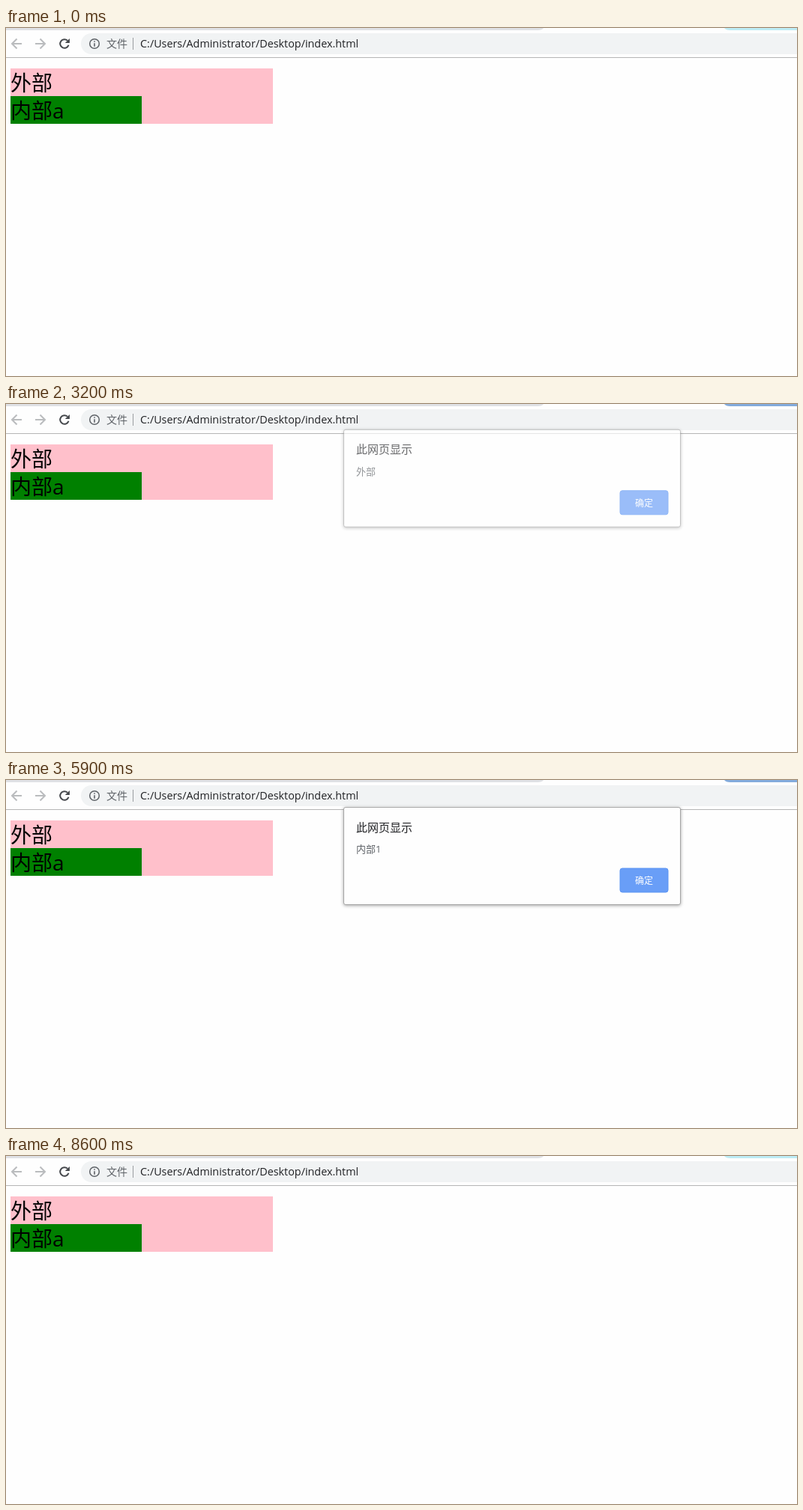
These frames come from a looping animation (1055x465 px, 8.7 s). An HTML page:

```html
<!DOCTYPE html>
<html lang="zh-CN">
<head>
<meta charset="utf-8">
<title>index</title>
<style>
  html, body { margin: 0; width: 100%; height: 100%; overflow: hidden; background: #fefefe; }
  svg { display: block; width: 100%; height: 100%; font-family: "Open Sans", "Noto Sans CJK SC", "Noto Sans CJK", sans-serif; }
  .line { fill: none; stroke-width: 2; }
  .page { font-size: 28px; fill: #000; }
  .frame { fill: #fefefe; stroke: #a6a6a6; filter: drop-shadow(0 1.5px 2px rgba(0, 0, 0, .35)); }
</style>
</head>
<body>
<svg viewBox="0 0 1055 465">
  <path d="M0 0H717Q715 3 709 3H0z" fill="#dfe1e5"/>
  <path id="tab" d="M958 0H1055V3H966Q960 3 958 0z"/>

  <path class="line" stroke="#babcbe" d="M21 21H8.5M14.5 14.5L8 21l6.5 6.5M39 21H51.5M45.5 14.5L52 21l-6.5 6.5"/>
  <path class="line" stroke="#45484c" d="M83.5 22.7A5.8 5.8 0 1 1 82.1 16.9"/>
  <path fill="#45484c" d="M84.9 14V20.1H78.8z"/>

  <path fill="#f1f3f4" d="M1055 7H114a14 14 0 0 0 0 28H1055z"/>
  <circle cx="118" cy="21" r="6.3" fill="none" stroke="#5f6368" stroke-width="1.5"/>
  <path fill="#5f6368" d="M117.2 17.2h1.6v1.6h-1.6zM117.2 20.2h1.6v4.6h-1.6z"/>
  <text x="134" y="26" font-size="14" fill="#5f6368">文件</text>
  <path fill="#9a9da1" d="M169 13h1v16h-1z"/>
  <text x="179" y="26" font-size="14.37" fill="#202124">C:/Users/Administrator/Desktop/index.html</text>
  <path fill="#b6b6b6" d="M0 39H1055v1H0z"/>

  <rect x="6" y="54" width="350" height="74" fill="pink"/>
  <rect x="6" y="91" width="175" height="37" fill="green"/>
  <text class="page" x="6" y="84">外部</text>
  <text class="page" x="6" y="121">内部a</text>

  <g id="dialog">
    <rect class="frame" x="450.5" y="36.5" width="449" height="130" rx="2.5"/>
    <text x="467" y="68.7" font-size="15" fill="#202124">此网页显示</text>
    <rect id="mark" y="82" height="20" fill="#1967d2"/>
    <text id="message" y="97" font-size="13"></text>
    <rect id="button" x="819" y="118" width="64" height="32" rx="3"/>
    <text x="839" y="139" font-size="12" font-weight="500" fill="#fff">确定</text>
  </g>
</svg>

<script>
const LOOP = 8700, TICK = 100;
const $ = id => document.getElementById(id);

// drags: the text cursor moves from one character edge to another
const dialogs = [
  { text: '内部2', open: 900, ready: 1200, blur: 1800, press: 2700, close: 2800,
    drags: [{ from: 3, to: 0, start: 1800, end: 2000 }] },
  { text: '外部', open: 3100, ready: 3300, blur: 4200, press: 5300, close: 5600,
    drags: [{ from: 1, to: 0, start: 4400, end: 4400 }, { from: 0, to: 2, start: 4700, end: 4800 }] },
  { text: '内部1', open: 5800, ready: 5900, blur: 6500, press: 7400, close: 7500,
    drags: [{ from: 3, to: 0, start: 6500, end: 6600 }] }
];

// Stepped progress: the first step shows at start, the last at end.
const ramp = (t, start, end) => Math.min(1, (t - start + TICK) / (end - start + TICK));
const edge = i => 467 + 13 * i - (i > 2 ? 5 : 0);

function set(node, attrs) {
  for (const name in attrs) node.setAttribute(name, attrs[name]);
}

for (let i = 0; i < 3; i++) {
  const glyph = document.createElementNS('http://www.w3.org/2000/svg', 'tspan');
  set(glyph, { x: edge(i) });
  $('message').append(glyph);
}

function pose(t, { open, ready, close }) {
  if (t < close) {
    const p = ramp(t, open, ready);
    return { dy: -20 * (1 - p) ** 2, opacity: p };
  }
  const step = (t - close) / TICK;
  return { dy: -2 - 6 * step, opacity: step < 3 ? 1 - 0.4 * step : 0 };
}

function selection(t, drags) {
  const drag = drags.findLast(d => d.start <= t);
  if (!drag) return [0, 0];
  const anchor = drags[0].from;
  const head = Math.floor(drag.from + (drag.to - drag.from) * ramp(t, drag.start, drag.end) + 1e-6);
  return [Math.min(anchor, head), Math.max(anchor, head)];
}

function draw() {
  const t = Math.floor(performance.now() % LOOP / TICK) * TICK;
  const dialog = dialogs.findLast(d => d.open <= t);
  set($('tab'), { fill: t < 900 || t >= 8600 ? '#bdecf5' : '#83abdc' });
  set($('dialog'), { opacity: 0 });

  if (dialog) {
    const { dy, opacity } = pose(t, dialog);
    const [from, to] = selection(t, dialog.drags);
    const focused = t < dialog.blur, pressed = t === dialog.press;
    set($('dialog'), { transform: `translate(0 ${dy})`, opacity });
    set($('mark'), { x: edge(from), width: edge(to) - edge(from) });
    set($('button'), {
      fill: focused ? '#699ef7' : pressed ? '#4684ec' : '#4285f4',
      stroke: focused ? '#5a94f3' : 'none'
    });
    [...$('message').children].forEach((glyph, i) => {
      glyph.textContent = dialog.text[i] || '';
      set(glyph, { fill: i >= from && i < to ? '#fff' : '#5f6368' });
    });
  }
  requestAnimationFrame(draw);
}
draw();
</script>
</body>
</html>
```
